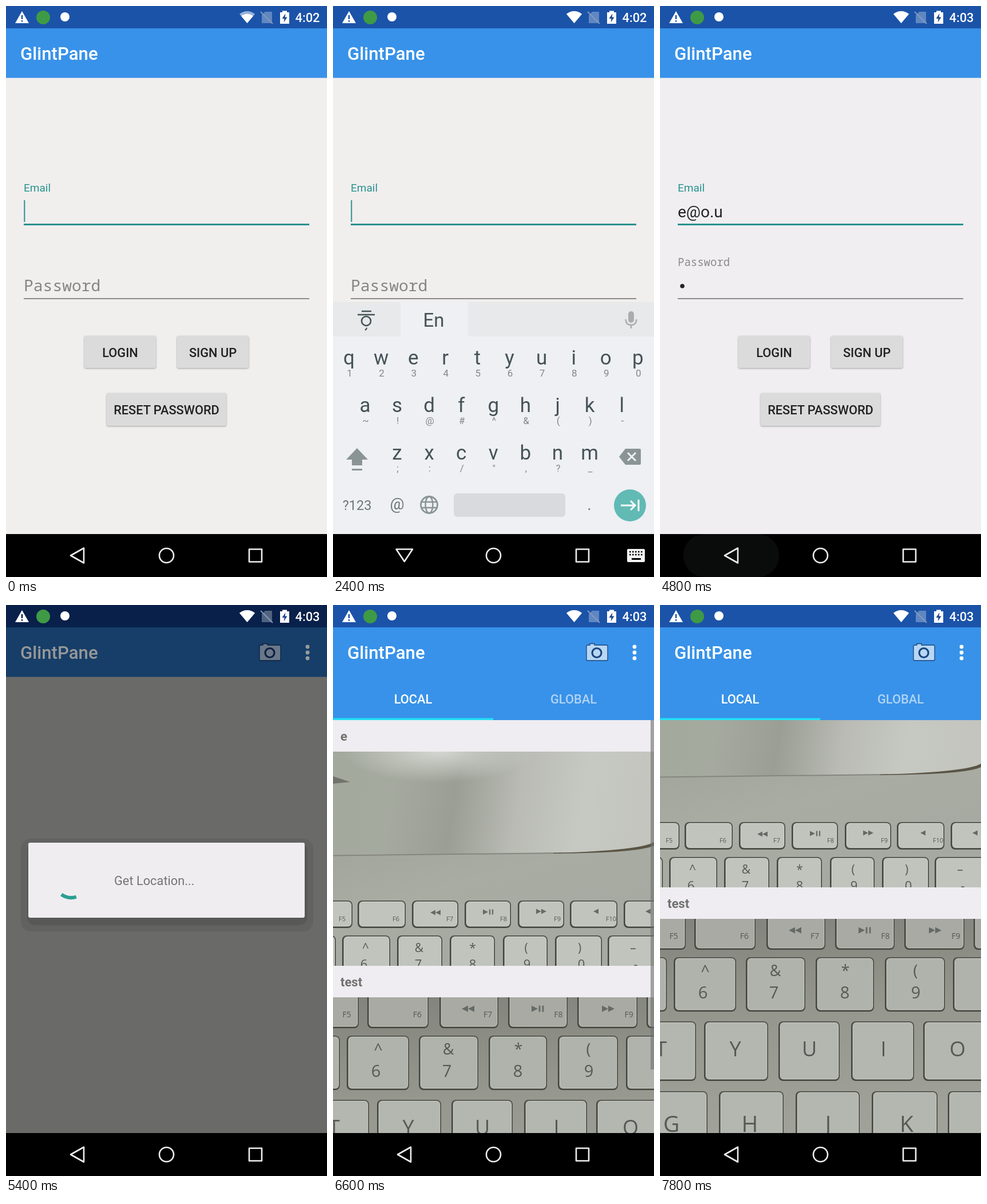
An HTML page for the animation above (8 s loop, 561 px wide and 997 px high).

```html
<!DOCTYPE html>
<html lang="en">
<head>
<meta charset="utf-8">
<style>
  html, body { margin: 0; width: 100%; height: 100%; overflow: hidden; background: #000; }
  #stage { display: block; width: 561px; height: 997px; font-family: Roboto, sans-serif; }
  .mid { text-anchor: middle; }
  .bold { font-weight: 500; }
  .mono { font-family: "Noto Sans Mono", monospace; }
  .button { filter: drop-shadow(0 1.5px 1.5px #0005); }
  .cap { font-family: "Open Sans", sans-serif; }
</style>
</head>
<body>
<svg id="stage" viewBox="0 0 561 997"></svg>
<script>
const STEP = 600, LOOP = 8000;
const APP = 'GlintPane';

const rect = (x, y, w, h, fill, extra = '') =>
  `<rect x="${x}" y="${y}" width="${w}" height="${h}" fill="${fill}" ${extra}/>`;
const circle = (x, y, r, fill, extra = '') =>
  `<circle cx="${x}" cy="${y}" r="${r}" fill="${fill}" ${extra}/>`;
const path = (d, fill, extra = '') => `<path d="${d}" fill="${fill}" ${extra}/>`;
const line = (d, color, width) => path(d, 'none', `stroke="${color}" stroke-width="${width}"`);
const text = (x, y, size, fill, str, cls = '', extra = '') =>
  `<text x="${x}" y="${y}" font-size="${size}" fill="${fill}" class="${cls}" ${extra}>${str.replace('&', '&amp;')}</text>`;
// Visible only during the listed steps, such as "0,2-4".
const at = (steps, ...parts) => `<g data-at="${steps}">${parts.join('')}</g>`;

function statusBar() {
  return [
    rect(0, 0, 561, 39, '#1b53a8'),
    at('9-10', rect(0, 0, 561, 39, '#08204a')),
    path('M28 9 L40 30 H16Z M26.7 16 V23 H29.3 V16Z M26.7 25 V27.6 H29.3 V25Z', '#fff', 'fill-rule="evenodd"'),
    circle(65, 20, 12, '#3f9a45'),
    circle(103, 19, 8, '#fff'),
    path('M408 14 Q421.5 4 435 14 L421.5 30Z', '#fff', 'opacity=".55"'),
    at('0-2', path('M411 17.5 Q421.5 10 432 17.5 L421.5 30Z', '#fff')),
    at('3-13', path('M408 14 Q421.5 4 435 14 L421.5 30Z', '#fff')),
    path('M453 10 H465 V30 H447 V16Z', '#fff', 'opacity=".3"'),
    line('M445 10 L466 31', '#8599b8', 2),
    path('M483 11 V8.5 H491 V11 H495 V31 H479 V11Z', '#fff'),
    path('M488.5 13 L482.5 22 H486.5 L485.5 28.5 L491.5 19.5 H487.5Z', '#1b448c'),
    at('0-6', text(505.5, 28, 21.8, '#fff', '4:02', 'bold')),
    at('7-13', text(505.5, 28, 21.8, '#fff', '4:03', 'bold')),
  ].join('');
}

const title = fill => text(25, 94, 31.2, fill, APP, 'bold');

const button = (x, y, w, h, label) =>
  rect(x, y, w, h, '#dbdbdb', 'rx="3" class="button"') +
  text(x + w / 2, y + 37, 21.8, '#212121', label, 'mid bold');

function login() {
  return at('0-8',
    rect(0, 125, 561, 797, '#f0eef1'),
    at('0-4', rect(0, 125, 561, 797, '#f1eeee')),
    rect(0, 39, 561, 86.5, '#3892e9'),
    title('#fff'),
    text(31, 324, 19, '#27938d', 'Email'),
    at('6-8', text(31, 369, 28, '#222', 'e@o.u')),
    at('0,2-4,6-7', rect(31.3, 339, 2, 38, '#27938d', 'id="cursor"')),
    rect(31, 380, 499, 3, '#27938d'),
    at('0-6', text(31, 498, 28, '#858584', 'Password', 'mono')),
    at('7-8', text(31, 454, 19, '#8b8a8c', 'Password', 'mono'), circle(39, 489, 3.8, '#222')),
    rect(31, 510, 499, 2, '#8c8b8c'),
    button(137, 576, 125, 56, 'LOGIN'),
    button(299, 576, 125, 56, 'SIGN UP'),
    button(176, 676, 209, 57, 'RESET PASSWORD'));
}

const keyRow = (x, y, letters, hints) => [...letters].map((c, i) =>
  text(x + 56.1 * i, y, 35, '#455358', c, 'mid') +
  text(x + 56.1 * i + 1, y + 21, 17, '#82878a', hints[i], 'mid')).join('');

function keyboard() {
  const gray = '#8a9593';
  return at('3-7',
    rect(0, 517, 561, 405, '#eef0f3'),
    rect(0, 517, 561, 60, '#e7e9ea'),
    rect(118, 517, 118, 60, '#eef0f3'),
    line('M50 533 H67 M43 539 H73 M58 562 Q60 563 56 566', '#455358', 2.4),
    circle(58, 550, 8, 'none', 'stroke="#455358" stroke-width="2.6"'),
    text(176, 560, 33, '#455358', 'En', 'mid'),
    rect(516, 533, 10, 20, '#aaadad', 'rx="5"'),
    line('M511.5 547 Q512 557 521 557 Q530 557 530.5 547 M521 557 V563', '#aaadad', 2.5),
    keyRow(28, 626, 'qwertyuiop', '1234567890'),
    keyRow(56, 709, 'asdfghjkl', '~!@#^&()-'),
    keyRow(112, 792, 'zxcvbnm', ';:/",?_'),
    path('M42 772 L61 792 H51 V802 H33 V792 H23Z M33 808 H51 V811 H33Z', gray),
    path('M511 773 H536 Q538 773 538 775 V799 Q538 801 536 801 H511 L500 787Z', gray),
    line('M515 780 L529 794 M529 780 L515 794', '#eef0f3', 3),
    text(42, 880, 23.5, '#6d777a', '?123', 'mid'),
    text(112, 879, 28, '#6d777a', '@', 'mid'),
    circle(168, 871, 14.5, 'none', `stroke="${gray}" stroke-width="2.8"`),
    `<ellipse cx="168" cy="871" rx="6.5" ry="14.5" fill="none" stroke="${gray}" stroke-width="2.5"/>`,
    line('M155 866 H181 M155 876 H181', gray, 2.5),
    rect(211, 851, 195, 41, '#d9dade', 'rx="6"'),
    text(448, 880, 28, '#6d777a', '.', 'mid'),
    circle(519, 872, 28, '#62bab5'),
    line('M503 872 H527 M520 864 L528 872 L520 880 M534 862 V882', '#fff', 3));
}

function menuIcons(body, edge, dots) {
  return path('M445 70 H449 V67.5 H457 V70 H478 Q480 70 480 72 V95 Q480 97 478 97 H445 Q443 97 443 95 V72 Q443 70 445 70Z',
    body, `stroke="${edge}" stroke-width="1.3"`) +
    circle(461, 83.5, 8, body, `stroke="${edge}" stroke-width="3.2"`) +
    [73, 83, 93].map(y => circle(527, y, 3.4, dots)).join('');
}

// Arc of the spinner, angles in degrees clockwise from the top.
function spinner(from, to) {
  const point = a => `${114 + 30 * Math.sin(a * Math.PI / 180)} ${481 - 30 * Math.cos(a * Math.PI / 180)}`;
  return line(`M${point(from)} A30 30 0 0 1 ${point(to)}`, '#2a9f93', 6);
}

function dialog() {
  return at('9-10',
    rect(0, 125, 561, 797, '#6a6a68'),
    rect(0, 39, 561, 86.5, '#163e68'),
    title('#969798'),
    menuIcons('#68788a', '#0d1f3e', '#9a9b9c'),
    rect(26, 408, 511, 162, '#626261', 'rx="18"'),
    rect(37, 415, 490, 144, '#585857', 'rx="14"'),
    rect(39, 415, 483, 131, '#efedf0', 'rx="3"'),
    at('9', spinner(163, 215)),
    at('10', spinner(179, 328)),
    text(189, 489, 21.8, '#757477', 'Get Location...'));
}

// A row of keys: every pair in spans is the left and right edge of one key.
const caps = (y, h, fill, spans) => spans.map(([a, b]) =>
  rect(a - 3, y - 2, b - a + 5, h + 4, '#45473f', 'rx="8"') +
  rect(a, y, b - a, h - 1, fill, 'rx="6" stroke="#fff" stroke-opacity=".25" stroke-width="2"')).join('');
const labels = (y, size, x, gap, words) => words.map((w, i) =>
  text(x + gap * i, y, size, '#565954', w, 'mid cap')).join('');

// Triangles of the media keys; x is the tip of the left-pointing one.
const back = (x, y, s) => path(`M${x} ${y} l${2 * s} ${-s} v${2 * s}Z`, '#666a66');
const next = (x, y, s) => path(`M${x} ${y} l${-2 * s} ${-s} v${2 * s}Z`, '#666a66');
const rewind = (x, y, s) => back(x - 2 * s, y, s) + back(x, y, s);
const forward = (x, y, s) => next(x, y, s) + next(x + 2 * s, y, s);
const play = (x, y, s) => next(x, y, s) +
  line(`M${x + 3} ${y - s} v${2 * s} M${x + s + 3.5} ${y - s} v${2 * s}`, '#666a66', s / 2);

// Nested viewport, so that the content keeps stage coordinates but is cropped.
const crop = (y, h, ...parts) =>
  `<svg x="0" y="${y}" width="561" height="${h}" viewBox="0 ${y} 561 ${h}">${parts.join('')}</svg>`;

function deskPhoto() {
  return crop(256, 374,
    rect(0, 256, 561, 374, 'url(#deck)'),
    path('M0 256 H561 V415 Q545 426 430 432 L0 437Z', 'url(#lid)'),
    rect(0, 256, 561, 180, 'url(#glow)'),
    line('M0 437.5 L400 433', '#85877f', 2),
    path('M385 433 Q535 429 561 414 V420 Q535 433 385 434Z', '#5b5546'),
    path('M0 299 L30 309 L0 312Z', '#70746d'),
    caps(518, 44, '#c0c4bd', [[-40, 32], [46, 125], [141, 217], [233, 309], [326, 402], [417, 495], [511, 590]]),
    caps(579, 70, '#c0c4bd', [[-80, 3], [19, 98], [115, 189], [207, 281], [300, 373], [391, 468], [483, 580]]),
    labels(552, 11, 16, 94, ['F5', 'F6', 'F7', 'F8', 'F9', 'F10']),
    rewind(179, 537, 4.5), play(271, 536, 4.5), forward(364, 535, 4.5),
    back(455, 535, 4.5), back(546, 535, 4.5),
    labels(606, 21, 57, 93.5, ['^', '&', '*', '(', ')', '–']),
    labels(635, 22, 54, 95, ['6', '7', '8', '9', '0', '-']));
}

function keysPhoto() {
  return crop(685, 374,
    rect(0, 685, 561, 374, 'url(#metal)'),
    caps(670, 67, '#a8aaa3', [[-80, 43], [63, 165], [189, 287], [309, 408], [430, 530], [551, 660]]),
    caps(754, 91, '#b0b2ac', [[-90, 10], [27, 131], [153, 252], [275, 372], [396, 496], [515, 620]]),
    caps(866, 100, '#b4b6b0', [[-60, 61], [80, 187], [210, 312], [337, 442], [463, 575]]),
    caps(988, 90, '#b4b6b0', [[-30, 81], [106, 214], [240, 347], [373, 483], [506, 620]]),
    labels(720, 14, 24, 123.3, ['F5', 'F6', 'F7', 'F8', 'F9']),
    rewind(236, 705, 5.5), play(358, 705, 5.5), forward(481, 705, 5.5),
    labels(785, 27, 79, 122.5, ['^', '&', '*', '(']),
    labels(824, 29, 75, 124, ['6', '7', '8', '9']),
    labels(925, 36, 2, 129.5, ['T', 'Y', 'U', 'I', 'O']),
    labels(1057, 39, 20, 137, ['G', 'H', 'J', 'K']));
}

const header = (y, label) => rect(0, y, 561, 55, '#efedf1') +
  text(13, y + 36, 22, '#70726f', label, '', 'font-weight="700"');

function wall() {
  return at('11-13',
    crop(201, 721,
      `<g id="list">${header(201, 'e')}${deskPhoto()}${header(630, 'test')}${keysPhoto()}</g>`,
      at('11', rect(555, 201, 6, 610, '#6f706f', 'opacity=".6"')),
      at('12', rect(555, 312, 6, 610, '#6f706f', 'opacity=".6"'))),
    rect(0, 39, 561, 162, '#3892e9'),
    title('#fff'),
    menuIcons('#b8d7f5', '#1b467e', '#fff'),
    text(140, 172, 21.8, '#fff', 'LOCAL', 'mid bold'),
    text(420.5, 172, 21.8, '#b0d3f6', 'GLOBAL', 'mid bold'),
    rect(0, 197.5, 280, 3.5, '#22e0f5'));
}

function navBar() {
  const outline = d => path(d, 'none', 'stroke="#eee" stroke-width="2.6" stroke-linejoin="round"');
  const dots = path('M518 953 H542 M518 958 H542', 'none',
    'stroke="#000" stroke-width="2.6" stroke-dasharray="2.6 2.4"');
  return [
    rect(0, 922, 561, 75, '#000'),
    at('8', rect(41, 922, 167, 75, '#0a0c0b', 'rx="37"')),
    at('0-2,8-13', outline('M113 959.5 L136 946.5 V972.5Z')),
    at('3-7', outline('M110.5 948.5 H139 L124.8 970Z'),
      rect(514, 948, 31, 23, '#f2f2f2', 'rx="2"'), dots, rect(522, 964, 16, 3, '#000')),
    circle(280.5, 959.5, 12.5, 'none', 'stroke="#eee" stroke-width="2.6"'),
    outline('M425 948.5 H447 V970.5 H425Z'),
  ].join('');
}

const gradient = (id, x2, y2, ...stops) =>
  `<linearGradient id="${id}" x2="${x2}" y2="${y2}">` +
  stops.map((c, i) => `<stop offset="${i / (stops.length - 1)}" stop-color="${c}"/>`).join('') +
  '</linearGradient>';

const stage = document.getElementById('stage');
stage.innerHTML = `<defs>
  ${gradient('lid', 1, 0.05, '#a3a99c', '#a5aa9f', '#9b9e95', '#b9bbb4', '#c6c8c2', '#c3c5be')}
  ${gradient('deck', 0.4, 1, '#999d93', '#a0a49a', '#a8aca3', '#a5a9a1')}
  ${gradient('metal', 0.1, 1, '#82837c', '#96988f', '#a0a29a')}
  <radialGradient id="glow" cx=".33" cy="0" r=".3">
    <stop stop-color="#d4d7d1"/><stop offset="1" stop-color="#d4d7d1" stop-opacity="0"/>
  </radialGradient></defs>` +
  login() + keyboard() + dialog() + wall() + statusBar() + navBar();

const timed = [...stage.querySelectorAll('[data-at]')].map(node => ({
  node,
  ranges: node.dataset.at.split(',').map(r => r.split('-').map(Number)),
}));
const list = document.getElementById('list');
const cursor = document.getElementById('cursor');

function draw() {
  const step = Math.floor(performance.now() % LOOP / STEP);
  for (const { node, ranges } of timed) {
    const shown = ranges.some(([from, to = from]) => step >= from && step <= to);
    node.style.display = shown ? '' : 'none';
  }
  cursor.setAttribute('x', step < 6 ? 31.3 : 109);
  list.setAttribute('transform', `translate(0 ${step > 11 ? -137 : 0})`);
  requestAnimationFrame(draw);
}
draw();
</script>
</body>
</html>
```
